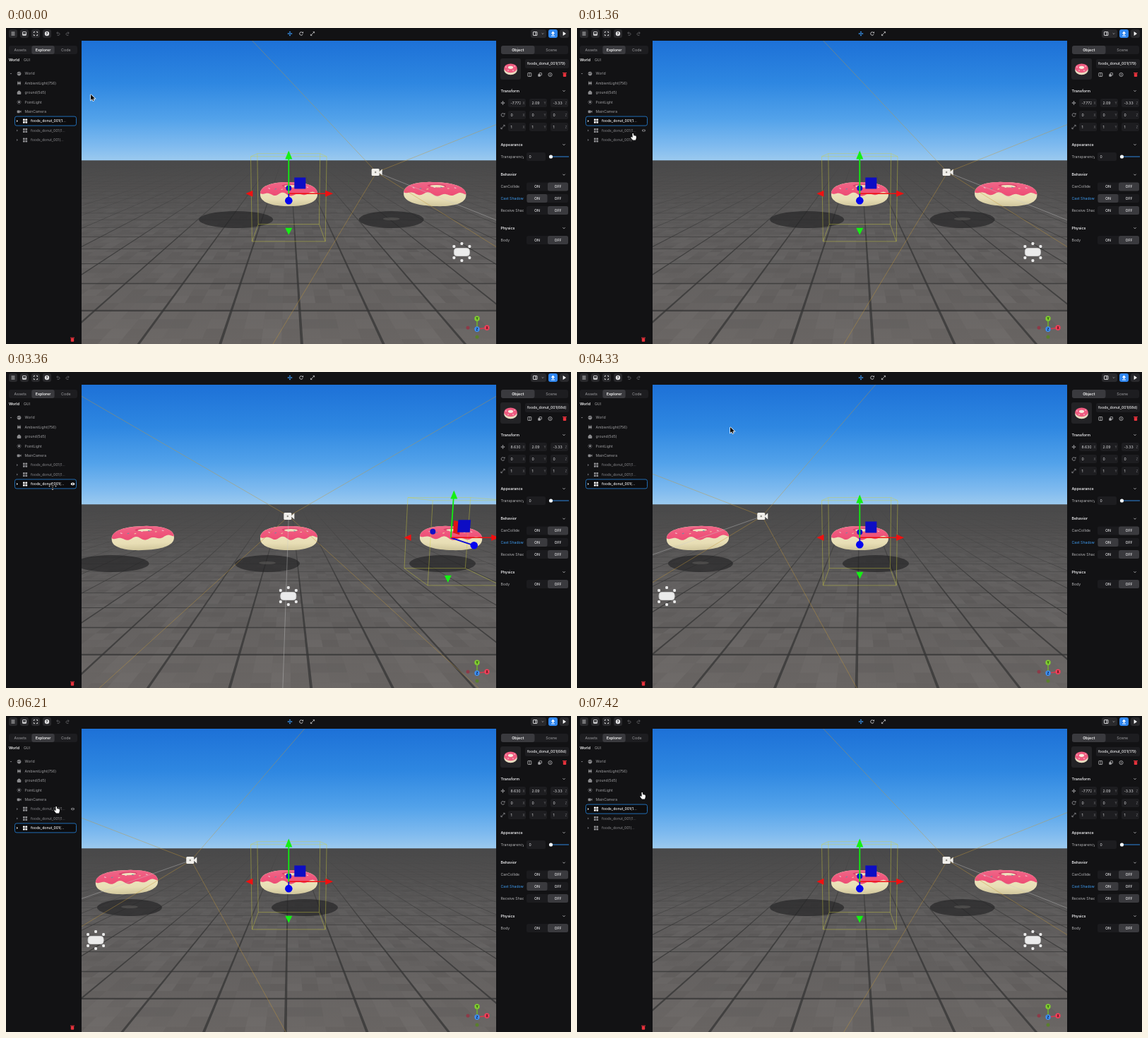
Animation, 800 px wide and 447 px high, one loop 7.45 s. Source, as an HTML page with a canvas:

```html
<!DOCTYPE html>
<html lang="en">
<head>
<meta charset="utf-8">
<title>Scene editor</title>
<style>
html, body { margin: 0; width: 100%; height: 100%; overflow: hidden; background: #121214; }
canvas { display: block; }
</style>
</head>
<body>
<canvas id="stage" width="800" height="447"></canvas>
<script>
const LOOP = 7450;
let c = document.getElementById('stage').getContext('2d');

// Selection and camera focus change abruptly: [time, object index]
const selections = [[0, 0], [1620, 1], [3200, 2], [6380, 0]];
const focuses = [[0, 0], [1840, 1], [3560, 2], [6620, 0]];
const pointer = [[0, 120, 94], [500, 120, 94], [1250, 79, 149], [1750, 79, 149], [2180, 69, 125],
  [2600, 70, 113], [3050, 66, 158], [3650, 66, 158], [4250, 217, 78], [5350, 217, 78],
  [6130, 71, 128], [6800, 71, 128], [7420, 92, 108], [7450, 93, 107]];
const objects = [
  { x: -7.772, id: '179', pos: '-7.772', shadow: 150, sw: 105 },
  { x: 0, id: '174', pos: '0', shadow: 370, sw: 92 },
  { x: 8.63, id: '68d', pos: '8.630', shadow: 618, sw: 94 }
];

// ---- drawing helpers ----
function poly(points, fill) {
  c.beginPath();
  points.forEach(p => c.lineTo(p[0], p[1]));
  c.closePath();
  c.fillStyle = fill;
  c.fill();
}
function line(points, color, width = 1) {
  c.beginPath();
  points.forEach(p => c.lineTo(p[0], p[1]));
  c.strokeStyle = color;
  c.lineWidth = width;
  c.stroke();
}
function oval(x, y, rx, ry, fill) {
  c.beginPath();
  c.ellipse(x, y, rx, ry, 0, 0, 7);
  c.fillStyle = fill;
  c.fill();
}
function box(x, y, w, h, r, fill, stroke) {
  c.beginPath();
  c.roundRect(x, y, w, h, r);
  if (fill) { c.fillStyle = fill; c.fill(); }
  if (stroke) { c.strokeStyle = stroke; c.lineWidth = 0.9; c.stroke(); }
}
function text(s, x, y, color = '#c4c4c6', size = 5.2, weight = 400, align = 'left') {
  c.font = `${weight} ${size}px Inter, sans-serif`;
  c.textAlign = align;
  c.textBaseline = 'middle';
  c.fillStyle = color;
  c.fillText(s, x, y + 0.3);
}
function clipped(x, y, w, h, draw) {
  c.save();
  c.beginPath();
  c.rect(x, y, w, h);
  c.clip();
  draw();
  c.restore();
}
function gradient(y0, y1, stops) {
  const g = c.createLinearGradient(0, y0, 0, y1);
  stops.forEach(s => g.addColorStop(s[0], s[1]));
  return g;
}
function latest(list, t) {
  return list.filter(k => k[0] <= t).pop()[1];
}

// ---- 3D view ----
const SIN = Math.sin(0.15), COS = Math.cos(0.15), FLOOR = -2.1, DISTANCE = 19.06;
const TILE = 2, TILE_X = 0.55, TILE_Z = 1, PATCH = 0.5;
function project(x, y, z) {
  const depth = DISTANCE - y * SIN + z * COS;
  return [400.3 + 507 * x / depth, 234.3 - 507 * (y * COS + z * SIN) / depth];
}
function floorQuad(x0, x1, z0, z1, fill) {
  poly([[x0, z0], [x1, z0], [x1, z1], [x0, z1]].map(p => project(p[0], FLOOR, p[1])), fill);
}
function noise(i, j) {
  const v = Math.sin(i * 12.9 + j * 78.2) * 43758.5;
  return v - Math.floor(v);
}

function background(camX) {
  c.fillStyle = gradient(18, 188, [[0, '#1d71d7'], [0.35, '#2e87e1'], [0.65, '#52a2ea'], [0.88, '#80bbef'], [1, '#9ccaef']]);
  c.fillRect(107, 18, 587, 170);
  c.fillStyle = gradient(187, 447, [[0, '#4d4c4c'], [0.3, '#5d5b5b'], [1, '#6b6765']]);
  c.fillRect(107, 187.5, 587, 260);
  clipped(107, 187.5, 587, 260, () => {
    const wrap = n => ((n % 8) + 8) % 8;
    for (let i = -60; i < 60; i++) {
      for (let j = -24; j < 30; j++) {
        const n = noise(wrap(i) + 1, wrap(j) + 1) - 0.5;
        const x = i * PATCH + TILE_X - camX, z = j * PATCH;
        floorQuad(x, x + PATCH, z, z + PATCH, n > 0 ? `rgba(255,250,245,${n * 0.05})` : `rgba(0,0,0,${-n * 0.11})`);
      }
    }
    const dark = 'rgba(52,52,52,.75)';
    for (let i = -80; i <= 80; i += TILE) {
      const x = i + TILE_X - camX;
      floorQuad(x - 0.035, x + 0.035, -12, 64, dark);
    }
    for (let z = TILE_Z - 12; z < 64; z += TILE) floorQuad(-70, 70, z - 0.045, z + 0.045, dark);
    c.fillStyle = gradient(187, 300, [[0, 'rgba(72,72,73,.95)'], [0.3, 'rgba(77,76,76,.6)'], [1, 'rgba(90,89,88,0)']]);
    c.fillRect(107, 187, 587, 114);
  });
}
const backdrops = objects.map(o => {
  const layer = document.createElement('canvas'), main = c;
  layer.width = 800;
  layer.height = 447;
  c = layer.getContext('2d');
  background(o.x);
  c = main;
  return layer;
});

function donut(x, y, scale, tilt) {
  c.save();
  c.translate(x, y);
  c.rotate(tilt);
  c.scale(scale, 1);
  const soft = v => Math.sign(v) * Math.abs(v) ** 0.85;
  const rim = a => [40.5 * soft(Math.cos(a)), 0.5 + 17 * soft(Math.sin(a))];
  const body = [], icing = [];
  for (let a = 0; a < Math.PI * 2; a += 0.08) body.push(rim(a));
  poly(body, gradient(-8, 18, [[0, '#efe6bf'], [0.6, '#e8deb5'], [1, '#cfc59b']]));
  for (let a = Math.PI; a <= Math.PI * 2; a += 0.08) icing.push(rim(a));
  for (let u = 40; u >= -40; u--) {
    icing.push([u, -2 + 3 * Math.sqrt(1 - u * u / 1600) + 1.8 * Math.sin(u * 0.3 + 1) + Math.sin(u * 0.17)]);
  }
  poly(icing, gradient(-17, 4, [[0, '#ee6a8a'], [0.5, '#f0577d'], [1, '#ec4c74']]));
  oval(2, -11.4, 12, 2.4, '#d8456c');
  oval(3, -10.8, 9.5, 1.7, '#efe3bd');
  const colors = ['#f3cfd4', '#5f93a5', '#efcfa4'];
  for (let i = 0; i < 7; i++) {
    const u = -29 + i * 9, v = -10 + 6 * noise(i, 3);
    line([[u, v], [u + 2.4, v + noise(i, 5) * 2 - 1]], colors[i % 3], 1);
  }
  c.restore();
}

function gizmo(x) {
  const at = (dx, y, z) => project(x + dx, y, z);
  const yellow = 'rgba(206,206,60,.6)';
  const corners = [[-1.8, -1.8], [1.8, -1.8], [1.8, 1.8], [-1.8, 1.8]];
  [2.05, FLOOR].forEach(y => line([...corners, corners[0]].map(p => at(p[0], y, p[1])), yellow, 0.7));
  corners.forEach(p => line([at(p[0], FLOOR, p[1]), at(p[0], 2.05, p[1])], yellow, 0.7));

  // Handles grow with distance so they keep their size on screen
  const k = Math.hypot(DISTANCE, x) / DISTANCE;
  const arm = (dx, y, z) => at(dx * k, y * k, z * k);
  const o = at(0, 0, 0), up = arm(0, 2.2, 0), down = arm(0, -2.1, 0);
  const left = arm(-2.1, 0, 0), right = arm(2.1, 0, 0), near = arm(0, 0, -2.2), far = arm(0, 0, 2.2);
  oval(far[0], far[1], 4, 4, '#1010c8');
  line([o, near], '#0808d8', 1.8);
  poly([arm(0, 0.26, -0.2), arm(0, 0.86, -0.2), arm(0, 0.86, -0.85), arm(0, 0.26, -0.85)], '#e01414');
  poly([arm(0.3, 0.26, 0), arm(0.9, 0.26, 0), arm(0.9, 0.86, 0), arm(0.3, 0.86, 0)], '#0d0dc4');
  line([o, right], '#f01010', 1.6);
  line([o, up], '#10f010', 1.8);
  const [ux, uy] = up, [dx, dy] = down;
  poly([[ux - 5, uy + 10], [ux, uy - 2], [ux + 5, uy + 10]], '#14f014');
  poly([[dx - 5, dy - 6], [dx + 5, dy - 6], [dx, dy + 4]], '#14f014');
  poly([[left[0] - 5, o[1]], [left[0] + 5, o[1] - 4.5], [left[0] + 5, o[1] + 4.5]], '#f01010');
  poly([[right[0] + 7, o[1]], [right[0] - 4, o[1] - 4.5], [right[0] - 4, o[1] + 4.5]], '#f01010');
  oval(near[0], near[1], 5.3, 5.3, '#0505f0');
}

function sceneIcons(camX) {
  const x = 400.3 - camX * 16, y = 204;
  // Each guide line runs from the camera icon away from a fixed vanishing point
  const ray = (vx, vy, color) => {
    const dx = x - vx, dy = y - vy;
    line([[x, y], [x + dx * 9, y + dy * 9]], color, 0.8);
  };
  [[675, 363], [125, 363], [675, -45], [125, -45]].forEach(v => ray(...v, 'rgba(192,150,56,.55)'));
  ray(402, 155, 'rgba(200,200,200,.5)');
  box(x - 7, y - 5, 11, 10, 1.5, '#f0eeea');
  poly([[x + 3, y], [x + 8, y - 4.5], [x + 8, y + 4.5]], '#f0eeea');
  oval(x - 1.5, y, 1.2, 1.2, '#8c8a84');

  const lx = 399.8 - camX * 31.6, ly = 317;
  box(lx - 11, ly - 5.5, 22, 11, 4, '#ebebeb', '#cfcfcf');
  [[0, -12], [-11, -8], [11, -8], [-11, 8], [11, 8], [0, 12]].forEach(p =>
    box(lx + p[0] - 1.9, ly + p[1] - 2.1, 3.8, 4.2, 1.4, '#e9e9e9'));
}

function axisHelper() {
  line([[667, 426], [667, 411]], '#6fb52c', 1.5);
  line([[667, 426], [681, 424]], '#d83a50', 1.5);
  oval(654, 424, 2.5, 2.5, '#8d3a48');
  oval(667, 437, 2.5, 2.5, '#5a7f2d');
  oval(681, 424, 3.7, 3.7, '#f0405a');
  oval(667, 411, 3.7, 3.7, '#80cc30');
  oval(667, 426, 3.7, 3.7, '#3d8ff0');
  text('X', 681, 424, '#200', 4.5, 600, 'center');
  text('Y', 667, 411, '#020', 4.5, 600, 'center');
  text('Z', 667, 426, '#002', 4.5, 600, 'center');
}

function viewport(focus, selected) {
  const camX = objects[focus].x;
  c.drawImage(backdrops[focus], 0, 0);
  clipped(107, 18, 587, 429, () => {
    objects.forEach((o, i) => {
      const x = o.shadow - camX * 22.6;
      oval(x, 271, o.sw / 2, 12, 'rgba(32,32,33,.62)');
      if (i === 1) oval(x, 270, 12, 2, 'rgba(100,98,96,.5)');
    });
    objects.forEach(o => {
      const dx = o.x - camX, side = Math.sign(dx);
      donut(400.5 + dx * 26.6, 234.5, side ? 1.09 : 1, side * 0.035);
    });
    sceneIcons(camX);
    gizmo(objects[selected].x - camX);
    axisHelper();
  });
}

// ---- interface ----
function chevron(x, y, color = '#b8b8ba', r = 1.6) {
  line([[x - r, y - r / 2], [x, y + r / 2], [x + r, y - r / 2]], color, 0.9);
}
function moveIcon(x, y, color, r = 3) {
  line([[x - r, y], [x + r, y]], color, 0.9);
  line([[x, y - r], [x, y + r]], color, 0.9);
  [[1, 0], [-1, 0], [0, 1], [0, -1]].forEach(([a, b]) => {
    const px = x + a * r, py = y + b * r;
    poly([[px + a, py + b], [px - a * 0.6 + b * 1.3, py - b * 0.6 + a * 1.3], [px - a * 0.6 - b * 1.3, py - b * 0.6 - a * 1.3]], color);
  });
}
function rotateIcon(x, y, color) {
  c.beginPath();
  c.arc(x, y, 2.3, 0.3, 5.3);
  c.strokeStyle = color;
  c.lineWidth = 0.9;
  c.stroke();
  poly([[x + 0.6, y - 1], [x + 3, y - 3], [x + 3, y - 0.6]], color);
}
function scaleIcon(x, y, color) {
  line([[x - 2.5, y + 2.5], [x + 2.5, y - 2.5]], color, 0.8);
  line([[x + 0.6, y - 2.6], [x + 2.6, y - 2.6], [x + 2.6, y - 0.6]], color, 0.8);
  line([[x - 0.6, y + 2.6], [x - 2.6, y + 2.6], [x - 2.6, y + 0.6]], color, 0.8);
}
function trash(x, y) {
  box(x - 2.2, y - 1.6, 4.4, 4.8, 0.8, '#e8323c');
  line([[x - 3, y - 2.3], [x + 3, y - 2.3]], '#e8323c', 1);
}
function tabs(x, w, labels, active) {
  const step = w / labels.length;
  box(x, 25, w, 12, 3, '#1d1d20');
  labels.forEach((s, i) => {
    if (i === active) box(x + i * step, 25, step, 12, 3, '#3a3a3e');
    text(s, x + (i + 0.5) * step, 31, i === active ? '#f4f4f4' : '#a0a0a3', 5.4, i === active ? 600 : 400, 'center');
  });
}

function topBar() {
  c.fillStyle = '#121214';
  c.fillRect(0, 0, 800, 18);
  const ink = '#e2e2e4';
  [10, 26, 42, 58].forEach(x => box(x - 6, 2, 12, 12, 3, '#29292c'));
  [-2, 0, 2].forEach(d => line([[7.5, 8 + d], [12.5, 8 + d]], ink, 0.8));
  box(23.5, 5.5, 5, 5, 0.6, null, ink);
  line([[23.5, 9], [28.5, 9]], ink, 1.4);
  [[-1, -1], [1, -1], [-1, 1], [1, 1]].forEach(([a, b]) =>
    line([[42 + a, 8 + b * 2.6], [42 + a * 2.6, 8 + b * 2.6], [42 + a * 2.6, 8 + b]], ink, 0.9));
  oval(58, 8, 3.2, 3.2, ink);
  text('?', 58, 8, '#222', 5, 700, 'center');
  [[74, 1], [87, -1]].forEach(([x, s]) => {
    line([[x - 1.5 * s, 10.3], [x + s, 10.3], [x + 2.3 * s, 8.7], [x + s, 7], [x - 2 * s, 7]], '#66666a', 0.8);
    line([[x - 0.6 * s, 5.4], [x - 2.3 * s, 7], [x - 0.6 * s, 8.6]], '#66666a', 0.8);
  });
  moveIcon(402, 8, '#3a97f2', 2.5);
  rotateIcon(418, 8, '#c8c8ca');
  scaleIcon(434, 8, '#c8c8ca');
  box(743, 2, 22, 12, 3, '#29292c');
  box(746.5, 5.5, 5.5, 5, 0.4, null, ink);
  line([[750, 5.5], [750, 10.5]], ink, 0.9);
  chevron(760, 8, '#a0a0a4', 1.3);
  box(768, 2, 13, 12, 3, '#2f86ee');
  poly([[771.8, 8], [774.5, 4.6], [777.2, 8]], '#fff');
  line([[774.5, 7], [774.5, 10]], '#fff', 1.6);
  line([[772, 11], [777, 11]], '#fff', 0.9);
  box(784, 2, 13, 12, 3, '#29292c');
  poly([[788.6, 5], [793, 8], [788.6, 11]], '#fff');
}

const rowY = i => 64.6 + i * 13.4;
function hoveredRow(px, py) {
  const i = Math.round((py - rowY(0)) / 13.4);
  return px < 105 && Math.abs(py - rowY(i)) < 5 ? i : -1;
}
function treeIcon(kind, y, color) {
  const x = kind < 5 ? 18.5 : 27;
  if (kind === 0) {
    oval(x, y, 2.8, 2.8, color);
    line([[x - 2.5, y], [x + 2, y - 1]], '#222', 0.7);
  } else if (kind === 1) {
    box(x - 2.5, y - 1.2, 5, 2.4, 0.8, color);
    [-2, 0, 2].forEach(d => line([[x + d, y - 2.8], [x + d, y + 2.8]], color, 0.6));
  } else if (kind === 2) {
    box(x - 2.8, y - 1.5, 5.6, 4, 1, color);
    oval(x, y - 1, 2, 1.8, color);
  } else if (kind === 3) {
    oval(x, y, 1.5, 1.5, color);
    for (let a = 0; a < 6.2; a += Math.PI / 4) {
      oval(x + 2.6 * Math.cos(a), y + 2.6 * Math.sin(a), 0.5, 0.5, color);
    }
  } else if (kind === 4) {
    box(x - 2.8, y - 1.8, 4, 3.8, 0.8, color);
    poly([[x + 1, y], [x + 3, y - 1.7], [x + 3, y + 1.7]], color);
  } else {
    [[-3, -3], [0.4, -3], [-3, 0.4], [0.4, 0.4]].forEach(p => box(x + p[0], y + p[1], 2.7, 2.7, 0.6, color));
  }
}
function leftPanel(selected, hovered) {
  c.fillStyle = '#121214';
  c.fillRect(0, 18, 107, 429);
  tabs(4, 97, ['Assets', 'Explorer', 'Code'], 1);
  text('World', 4, 45, '#f4f4f4', 5.2, 600);
  text('GUI', 25, 45, '#a8a8aa', 5.2);
  chevron(7, 64.5, '#808084', 1.1);
  const names = ['World', 'AmbientLight(756)', 'ground(5d5)', 'PointLight', 'MainCamera',
    'foods_donut_001(1...', 'foods_donut_001(1...', 'foods_donut_001(...'];
  names.forEach((name, i) => {
    const y = rowY(i), on = i === selected + 5;
    const color = on ? '#f4f4f4' : '#8b8b8e';
    if (on) box(12.5, y - 6.5, 87, 13, 2.5, '#0c0c0e', '#2377c4');
    treeIcon(i, y, color);
    if (i > 4) poly([[15, y - 1.6], [17, y], [15, y + 1.6]], on ? '#ddd' : '#66666a');
    text(name, i > 4 ? 35 : 26.5, y, i > 4 ? color : '#a0a0a3', 5.1, on ? 500 : 400);
    if (i > 4 && i === hovered) {
      oval(94.5, y, 2.7, 1.8, on ? '#fff' : '#77777a');
      oval(94.5, y, 0.9, 0.9, '#121214');
    }
  });
  trash(94, 440.5);
}

function section(title, y) {
  text(title, 700.5, y, '#e6e6e8', 5.3, 600);
  chevron(790, y);
}
function field(x, y, w, value, suffix) {
  box(x, y - 6, w, 12, 2.5, '#1d1d20');
  clipped(x, y - 6, suffix ? w - 7.5 : w, 12, () => text(value, x + 3.5, y, '#e0e0e2'));
  if (suffix) text(suffix, x + w - 3, y, '#6d6d70', 4.6, 400, 'center');
}
function toggle(label, y, on) {
  clipped(700, y - 6, 33, 12, () => text(label, 700.5, y, on ? '#3f9cf0' : '#b4b4b6'));
  box(737, y - 6, 59, 12, 2.5, '#1b1b1e');
  box(on ? 737.5 : 767, y - 6, 29, 12, 2.5, '#3a3a3e');
  text('ON', 752, y, '#e6e6e8', 5.2, 500, 'center');
  text('OFF', 781.5, y, '#e6e6e8', 5.2, 500, 'center');
}
function rightPanel(o) {
  c.fillStyle = '#121214';
  c.fillRect(694, 18, 106, 429);
  tabs(701, 95, ['Object', 'Scene'], 0);
  box(700, 43, 29, 30, 3, '#232326');
  oval(714.5, 59.5, 9.3, 6.7, '#e8dcc0');
  oval(714.5, 56.8, 9.3, 6.4, '#ef5b80');
  oval(714.5, 55.8, 3.6, 2.1, '#f6ebdc');
  [[708, 55], [711, 60], [718, 60], [720, 54]].forEach(p => oval(p[0], p[1], 0.9, 0.6, '#fff'));
  box(735, 44, 62, 13, 2.5, '#1d1d20');
  clipped(735, 44, 60, 13, () => text(`foods_donut_001(${o.id})`, 738, 50.5, '#eeeeef', 5.2, 500));
  box(738.8, 63.5, 5, 5, 0.5, null, '#a8a8aa');
  line([[741.3, 63.5], [741.3, 68.5]], '#a8a8aa', 0.7);
  box(755, 63.5, 3.5, 3.5, 0.6, null, '#a8a8aa');
  box(753.3, 65.2, 3.5, 3.5, 0.6, '#a8a8aa');
  box(767.9, 63.4, 5.2, 5.2, 2.6, null, '#a8a8aa');
  line([[770.5, 64.7], [770.5, 67.5]], '#a8a8aa', 0.8);
  trash(791, 65.8);

  section('Transform', 89);
  const rows = [[o.pos, '2.09', '-3.33'], ['0', '0', '0'], ['1', '1', '1']];
  rows.forEach((row, i) => row.forEach((v, j) => field(711 + j * 30, 106 + i * 17, 25, v, 'XYZ'[j])));
  moveIcon(703.5, 106, '#8f8f92', 2);
  rotateIcon(703.5, 123, '#8f8f92');
  scaleIcon(703.5, 140, '#8f8f92');

  section('Appearance', 165);
  clipped(700, 176, 33, 12, () => text('Transparency', 700.5, 182, '#b4b4b6'));
  field(737, 182, 27, '0');
  line([[771, 182], [797, 182]], '#2a74bf', 1.2);
  oval(771.5, 182, 2.6, 2.6, '#f2f6fa');

  section('Behavior', 207.5);
  toggle('CanCollide', 224.5, false);
  toggle('Cast Shadow', 241, true);
  toggle('Receive Shadow', 258, false);
  section('Physics', 283);
  toggle('Body', 300, false);
}

function drawPointer(t, x, y, hand) {
  if (t > 3200 && t < 3600) {
    moveIcon(x, y + 3.5, '#fff', 4.5);
    moveIcon(x, y + 3.5, '#111', 3.4);
    return;
  }
  const arrowShape = [[0, 0], [0, 8], [2, 6.3], [3.3, 9], [4.6, 8.4], [3.4, 5.8], [6, 5.8]];
  const handShape = [[-0.5, 0], [0.8, 0], [1.2, 3], [4.6, 3.8], [5, 6], [4, 9.5], [0, 9.5], [-2.8, 6], [-2, 5], [-0.3, 6]];
  const shape = (hand ? handShape : arrowShape).map(p => [x + p[0], y + p[1]]);
  line([...shape, shape[0]], hand ? '#111' : '#fff', 1.4);
  poly(shape, hand ? '#fff' : '#0a0a0a');
}
function pointerAt(t) {
  const i = Math.max(1, pointer.findIndex(k => k[0] >= t));
  const [t0, x0, y0] = pointer[i - 1], [t1, x1, y1] = pointer[i];
  const u = (t - t0) / (t1 - t0), e = u * u * (3 - 2 * u);
  return [x0 + (x1 - x0) * e, y0 + (y1 - y0) * e];
}

const start = performance.now();
function frame() {
  const t = (performance.now() - start) % LOOP;
  const selected = latest(selections, t), focus = latest(focuses, t);
  const [px, py] = pointerAt(t);
  const hovered = hoveredRow(px, py);
  viewport(focus, selected);
  topBar();
  leftPanel(selected, hovered);
  rightPanel(objects[selected]);
  drawPointer(t, px, py, hovered >= 0);
  requestAnimationFrame(frame);
}
frame();
</script>
</body>
</html>
```
